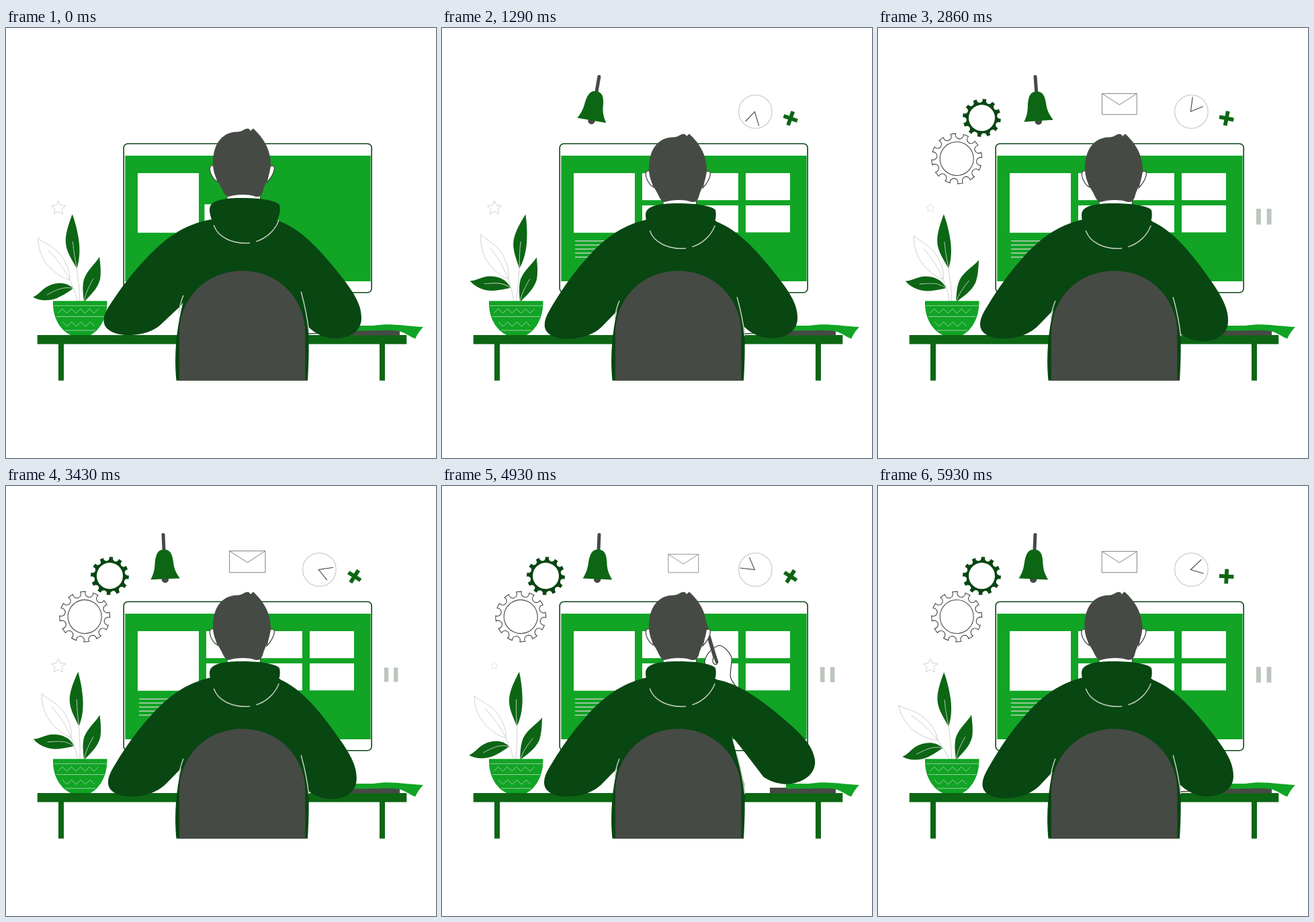
An HTML page that plays this animation: 640x640 px, repeating every 6 s.

```html
<!DOCTYPE html>
<html lang="en">
<head>
<meta charset="utf-8">
<title>Working at the desk</title>
<style>
  html, body { margin: 0; width: 100%; height: 100%; overflow: hidden; background: #fff; }
  svg { display: block; width: 100vw; height: 100vh; }
  .bright { fill: #11a425; }
  .mid { fill: #0c6614; }
  .dark { fill: #084612; }
  .gray { fill: #464a44; }
  .white { fill: #fff; }
  .thin { fill: none; stroke: #c9cec8; stroke-width: .9; }
  .seam { fill: none; stroke: #c3cec2; stroke-width: 1.5; stroke-linecap: round; }
  .ink { fill: #fff; stroke: #464a44; stroke-width: 1.3; }
  .pen { fill: none; stroke: #464a44; stroke-linecap: round; }
</style>
</head>
<body>
<svg viewBox="0 0 640 640">
  <rect class="white" width="640" height="640"/>

  <!-- monitor -->
  <rect x="175.2" y="172.2" width="369" height="221.6" rx="6" fill="#fff" stroke="#084612" stroke-width="1.6"/>
  <rect class="bright" x="177.3" y="190" width="365.4" height="187"/>
  <rect class="white" x="196" y="216" width="91" height="88.7"/>
  <g id="panels" class="white"></g>
  <g id="lines" stroke="#bdd0bd" stroke-width="1.6"></g>

  <!-- floating icons -->
  <g id="gearBig"><path fill="#fff" stroke="#464a44" stroke-width="1.1"/><circle r="25" fill="#fff" stroke="#464a44" stroke-width="1.1"/></g>
  <g id="gearSmall"><path class="dark"/><circle class="white" r="19.5"/></g>
  <g id="bell">
    <circle class="gray" cx="0" cy="67.5" r="5.2"/>
    <path class="pen" stroke-width="5" d="M0 1V26"/>
    <path class="mid" d="M0 23C9 23 12 30 13 40C14 53 16 57 22 67H-21.5C-16 57 -15 52 -14 41C-12 29 -9 23 0 23Z"/>
  </g>
  <path id="envelope" fill="none" stroke="#7d807c" d="M-26.7 -32.2H26.7V0H-26.7ZL0 -15L26.7 -32.2"/>
  <g id="clock">
    <circle r="24.8" fill="#fff" stroke="#c3c5c2" stroke-width="1.1"/>
    <path id="clockHands" fill="none" stroke="#3e423c" stroke-width="1.1"/>
  </g>
  <path id="plus" fill="none" stroke="#0c6614" stroke-width="5.8" d="M-10.8 0H10.8M0 -10.8V10.8"/>
  <path id="pause" fill="none" stroke="#bcc5bc" stroke-width="7" d="M3.5 -12V12M19.5 -12V12"/>
  <path id="star" class="thin"/>

  <!-- plant -->
  <g id="leafLeft">
    <path class="thin" d="M47.5 312.5C48 332 56 349 69 360C78 368 87 373 95 375C96 362 89 346 78 334C67 323 55 320 47.5 312.5ZM63 331C77 345 87 359 95 375Q103 391 107 408"/>
    <g id="leafLow">
      <path class="mid" d="M100 387.5C90 378 76 378 63 384C53 389 48 398 40 400.5C49 406 63 407 76 402C87 397 94 392 100 387.5Z"/>
      <path class="thin" d="M100 387.5C84 384 73 391 61 397"/>
    </g>
  </g>
  <g id="leafTop">
    <path class="mid" d="M98 277C93 291 88 305 88.3 318C89 334 99 346 105 358C109 346 110 332 108 317C106 302 102 288 98 277Z"/>
    <path class="thin" d="M99 318C100 333 103 346 105 358Q109 383 110 408"/>
  </g>
  <g id="leafRight">
    <path class="mid" d="M139 340.5C133 351 121 360 116 374C113 385 115 397 116 408C125 398 136 389 140 374C142 362 140 350 139 340.5Z"/>
    <path class="thin" d="M130 373C123 385 118 396 116 408"/>
  </g>
  <path class="bright" d="M70 406.3H150.5C151 431 140 449 126 457H96C80 449 69 431 70 406.3Z"/>
  <path fill="none" stroke="#a9cfaa" stroke-width=".9" d="M71 413.3H150M75 429.5H146M88 450H133"/>
  <path id="zigzags" fill="none" stroke="#a9cfaa" stroke-width=".9"/>

  <!-- desk -->
  <path class="mid" d="M46.7 457H596.3V470.4H564V524.8H556V470.4H86V524.8H78V470.4H46.7Z"/>
  <path class="gray" d="M488 449H586V457.5H488Z"/>
  <path class="bright" d="M512 443H547C572 439 586 443 621 445Q614 452 609 462.5C600 459 594 453 584 451C566 449 554 451 512 450.5Z"/>
  <path id="paperEdge" class="ink" d="M449 457V455L488 453.5V457"/>

  <!-- person -->
  <g id="hand">
    <path class="ink" d="M398 268C400 256 410 248 418 244.5C424 243 434 252 438 262C439 272 435 283 436.5 292C439 300 444 302 447 311L405 320Z"/>
    <g id="pencil">
      <path class="pen" stroke-width="5.5" d="M408.3 212L414.5 267"/>
      <path class="ink" d="M413.5 260C408 265 409 273 414 272.5C418 272 417 265 413.5 260Z"/>
      <path class="pen" stroke-width="4.5" d="M413 255L415.5 269"/>
    </g>
  </g>
  <path class="dark" d="M305 285L264 406C256 438 249 478 253.500 524.8H449C451 490 451 472 450 444L439 402L408 287Z"/>
  <path id="armLeft" class="dark" d="M305 285C262 295 235 320 212 347C190 372 174 397 160 421C156 428 153 435 153 442C153 456 168 463 187 463C208 463 227 456 238 445L266 416L340 300Z"/>
  <path id="armRight" class="dark" d="M408 288C440 300 470 332 503 375C523 401 529 416 529 432C529 450 513 462 490 462C475 462 460 455 449 444L425 395L375 300Z"/>
  <g id="upper">
    <path class="ink" d="M329 250V266H378.5V250Z"/>
    <g id="head">
      <path class="ink" d="M309 213C303 211 302 217 305 225C308 232 311 235 315 237ZM393 214C400 211 400.5 216 398 223C395 231 391 235 388 238Z"/>
      <path class="gray" d="M308 209C308 179 323 162 346 162.5C353 162 355 157 361 158C363 159 364 160 363.5 161.5L368 157.5C385 173 394 191 394 211C393 229 385 239 382 252C379 259 376 260 370 258.5C358 255 344 255.5 331 259C325 258 323 250 319 243C312 231 308 222 308 209Z"/>
    </g>
    <path class="dark" d="M303 278C303 263 328 261 353 261C380 261 402 265 407 271C410 284 404 298 392 309L320 312C309 301 303 290 303 278Z"/>
    <path class="seam" d="M309.5 302C315 318 335 330 362.5 328M373 325.5C387 321 400 310 406 294.5"/>
  </g>
  <path class="gray" d="M258 524.8V455C258 401 299 361.5 351.5 361.5C404 361.5 445.3 401 445.3 455V524.8Z"/>
  <path id="seams" class="seam" d="M263.8 406.5Q259 418 257 432M439.3 401Q448 433 450.5 458"/>
</svg>
<script>
const LOOP = 6000;
const $ = id => document.getElementById(id);
const set = (id, name, value) => $(id).setAttribute(name, value);
const place = (id, value) => set(id, 'transform', value);
const show = (id, visible) => set(id, 'visibility', visible ? 'visible' : 'hidden');
const clamp = x => Math.min(1, Math.max(0, x));

// Progress from 0 to 1 between two times, smooth at both ends.
function ease(t, from, to) {
  const x = clamp((t - from) / (to - from));
  return x * x * (3 - 2 * x);
}

// Progress from 0 to 1 with an overshoot.
function pop(t, from, to) {
  const x = clamp((t - from) / (to - from)) - 1;
  return 1 + 2.7 * x * x * x + 1.7 * x * x;
}

// Periodic motions; peak and width are fractions of the period.
const wave = (t, period, peak) => Math.cos(2 * Math.PI * (t / period - peak));
function bump(t, period, peak, width) {
  const x = (t / period % 1 - peak) / width;
  return Math.exp(-x * x);
}

function polar(r, degrees) {
  const a = degrees * Math.PI / 180;
  return `${(r * Math.cos(a)).toFixed(2)} ${(r * Math.sin(a)).toFixed(2)}`;
}

function gearPath(r, notch) {
  let d = `M${polar(r, -6)}`;
  for (let a = 0; a < 360; a += 30) {
    d += `A${r} ${r} 0 0 1 ${polar(r, a + 6)}A${notch} ${notch} 0 1 0 ${polar(r, a + 24)}`;
  }
  return d + 'Z';
}

function starPath(r) {
  let d = 'M';
  for (let i = 0; i < 10; i++) d += polar(i % 2 ? r * .48 : r, i * 36 - 90) + ' ';
  return d + 'Z';
}

function zigzag(x, y, step, count) {
  let d = `M${x} ${y}`;
  for (let i = 0; i < count; i++) d += `l${step} ${i % 2 ? 6.5 : -6.5}`;
  return d;
}

function add(parent, tag, attrs) {
  const node = document.createElementNS('http://www.w3.org/2000/svg', tag);
  for (const name in attrs) node.setAttribute(name, attrs[name]);
  return $(parent).appendChild(node);
}

const panels = [], textLines = [];
for (let i = 0; i < 6; i++) {
  panels.push({
    x: 331 + 77 * Math.floor(i / 2),
    y: i % 2 ? 236 : 284,
    node: add('panels', 'rect', { x: -33, y: -20, width: 66, height: 40.2 })
  });
}
for (let y = 317; y <= 341; y += 6) textLines.push(add('lines', 'line', { x1: 198, y1: y, y2: y }));

document.querySelector('#gearBig path').setAttribute('d', gearPath(37.4, 6));
document.querySelector('#gearSmall path').setAttribute('d', gearPath(28.4, 4.5));
set('star', 'd', starPath(11));
set('clockHands', 'd', `M${polar(20, 30)}L0 0L${polar(22, -30)}`);
set('zigzags', 'd', zigzag(77, 424.5, 6.75, 9) + zigzag(84, 437.5, 6.85, 7).replace(/-6.5/g, 'u').replace(/ 6.5/g, ' -6.5').replace(/u/g, '6.5'));

function drawScreen(t) {
  panels.forEach(({ x, y, node }, i) => {
    const from = 200 * i - 180;
    node.setAttribute('transform', `translate(${x} ${y}) scale(${pop(t, from, from + 380)})`);
  });
  textLines.forEach((line, i) => {
    const from = 600 + 70 * i;
    line.setAttribute('x2', 198 + 89 * ease(t, from, from + 300));
  });
}

function drawIcons(t) {
  const icon = (id, x, y, start, size = 1, angle = 0) =>
    place(id, `translate(${x} ${y}) rotate(${angle}) scale(${size * ease(t, start, start + 380)})`);
  icon('clock', 466.4, 124.5, 120);
  icon('plus', 518.7, 134.5, 480, 1, 84.6 - t * .12);
  icon('bell', 234, 71.5, 740, 1, 15 * wave(t, 1000, .155));
  icon('gearBig', 117.2, 194.5, 1400, 1, t * .06);
  icon('gearSmall', 154.5, 133.8, 2000, 1, -t * .06);
  icon('envelope', 359.3, 128.8, 2250, .92 + .08 * wave(t, 3000, .1));
  icon('pause', 563, 280.8, 2300, .91 + .09 * wave(t, 3000, .85));
  place('clockHands', `translate(-1 0) rotate(${t * .13 - 64.5})`);
  place('star', `translate(78 268) scale(${1 - .48 * bump(t, 2000, .47, .08)})`);
}

function drawPlant(t) {
  const left = 6 * ease(t, 0, 800) - 2.5 * ease(t, 1290, 2500) - 14.5 * ease(t, 4500, 5900);
  const low = 22 * (ease(t, 0, 800) - ease(t, 4150, 4900));
  place('leafLeft', `rotate(${left} 110 408)`);
  place('leafLow', `rotate(${low - left} 100 387.5)`);
  place('leafTop', `rotate(${5.7 + 5.8 * wave(t, 3000, .44)} 110 408)`);
  place('leafRight', `rotate(${10 * bump(t, 2000, .4, .18)} 116 408)`);
}

function drawPerson(t) {
  const bob = -8 * (1 - ease(t, 0, 800));
  place('upper', `translate(0 ${bob})`);
  place('seams', `translate(0 ${bob})`);
  place('head', `rotate(${-.7 * ease(t, 5300, 5930)} 353 258)`);
  place('armLeft', `rotate(${.4 - bob * .3 - 1.3 * bump(t, 4000, .47, .12)} 305 285)`);

  // The right arm types, then lifts the pencil to the ear.
  const typing = .25 * bump(t, LOOP, .265, .025) - .28 * ease(t, 2000, 2900);
  const lift = typing + 1.28 * ease(t, 3300, 4850) - ease(t, 5050, 5700);
  place('armRight', `rotate(${-11.2 * lift} 408 288)`);

  const drop = 100 * (1 - ease(t, 3250, 3800) + ease(t, 5150, 5600));
  const toEar = ease(t, 4000, 4850);
  place('hand', `translate(${-7 * toEar - drop * .2} ${-7 * toEar + drop})`);
  place('pencil', `rotate(${-10 * toEar} 414 266)`);
  show('hand', drop < 100);
  show('paperEdge', t < 3000 || t > 5600);
}

const start = performance.now();
function tick() {
  const t = (performance.now() - start) % LOOP;
  drawScreen(t);
  drawIcons(t);
  drawPlant(t);
  drawPerson(t);
  requestAnimationFrame(tick);
}
tick();
</script>
</body>
</html>
```
